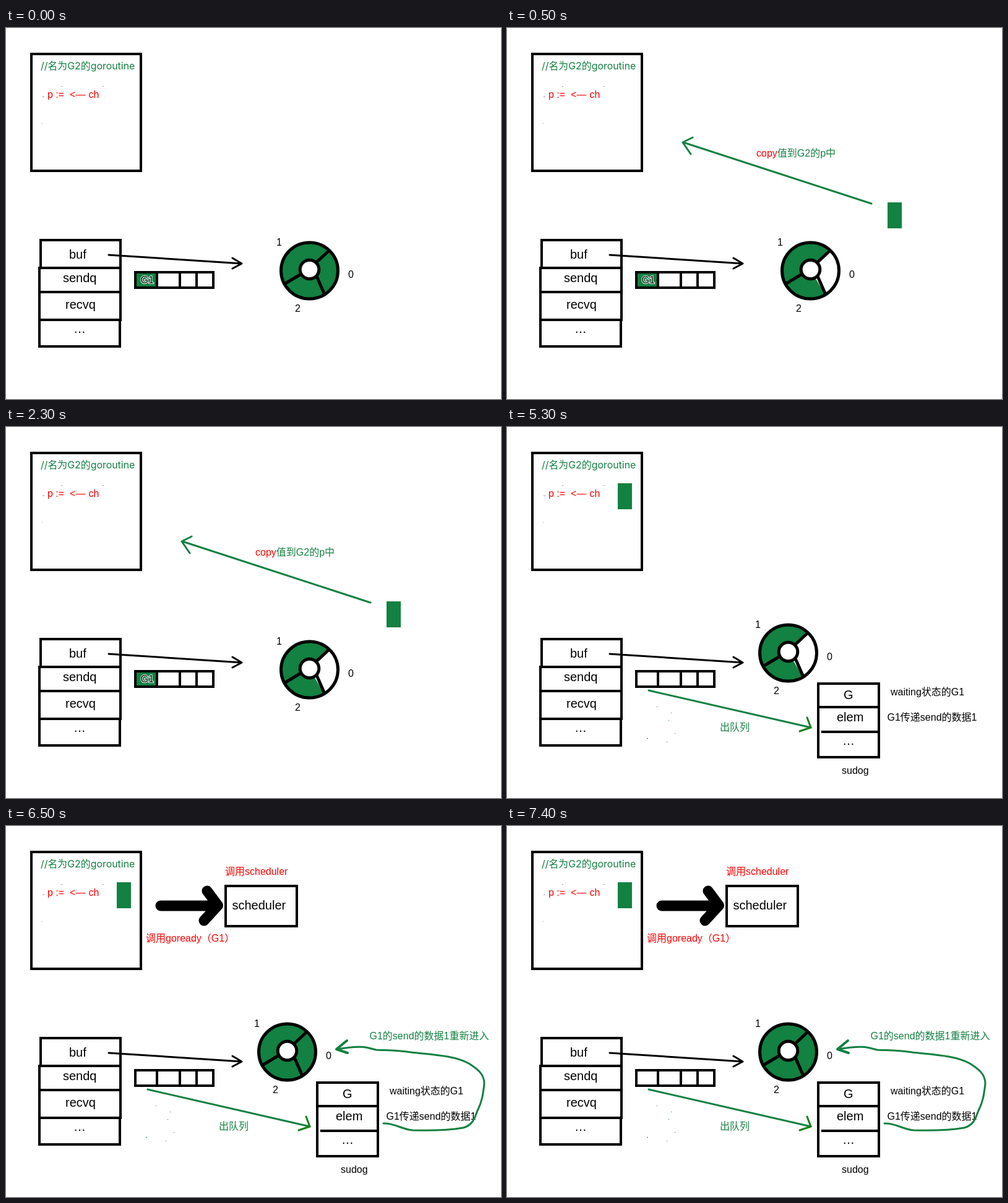
Recreate the animation shown at these times as an HTML page. Size 800 px wide and 600 px high, loop 8 s.

```html
<!DOCTYPE html>
<html lang="zh">
<head>
<meta charset="utf-8">
<title>Channel receive</title>
<style>
  html, body { margin: 0; width: 100%; height: 100%; overflow: hidden; background: #fff; }
  svg { display: block; width: 100vw; height: 100vh; }
  text { font: 16px "Liberation Sans", "Noto Sans CJK SC", "Noto Sans CJK", sans-serif; white-space: pre; }
  .big { font-size: 20px; }
  .code { font: 15.9px Inter, "Noto Sans CJK SC", "Noto Sans CJK", sans-serif; }
  .line { fill: none; stroke: #000; stroke-width: 4; }
  .thin { stroke-width: 3; stroke-linecap: round; stroke-linejoin: round; }
  .green { stroke: #128141; }
  .fill { fill: #128141; }
  .red { fill: #f00; }
</style>
</head>
<body>
<svg viewBox="0 0 800 600">
  <rect width="800" height="600" fill="#fff"/>

  <!-- receiving goroutine -->
  <rect class="line" x="41" y="42" width="177" height="189"/>
  <text class="code fill" x="56" y="66.5">//名为G2的goroutine</text>
  <text class="red" y="113"><tspan x="67">p :=</tspan><tspan x="103">&lt;</tspan><tspan x="112.5">—</tspan><tspan x="133.5">ch</tspan></text>
  <path d="M59 111h3M89 94.5h2M156 94.5h2M58 154.5h1" stroke="#999" fill="none"/>

  <!-- channel struct -->
  <path class="line" d="M56 343H185V472M56 341V388M52 388H185M54 386V517M52 427H187M52 472H187M184 472V515H54"/>
  <text class="big" x="102" y="373">buf</text>
  <text class="big" x="92" y="411">sendq</text>
  <text class="big" x="96" y="454">recvq</text>
  <text class="big" x="109" y="492.5">…</text>
  <path class="line thin" d="M166 367L381 381M366 372L381 381L366 389"/>

  <!-- send queue -->
  <rect id="head" class="fill" x="209" y="395" width="35" height="25"/>
  <path class="line" d="M209 395H335V420H209ZM244 395V420M281 395V420M308 395V420"/>
  <text id="g1" x="217.5" y="412.5" stroke="#fff" stroke-width="2" paint-order="stroke">G1</text>

  <!-- ring buffer -->
  <g id="ring">
    <ellipse class="fill" cx="490.5" cy="392.5" rx="46" ry="45.5"/>
    <path id="slot" d="M490 390L522 359A46 45.5 0 0 1 514 431Z" fill="#fff"/>
    <ellipse class="line" cx="490.5" cy="392.5" rx="46" ry="45.5" style="stroke-width:5"/>
    <path class="line" d="M490 390L522 360M490 390L450 414M497 390L514.5 430" style="stroke-width:5"/>
    <circle class="line" cx="490.5" cy="390.5" r="15.3" style="fill:#fff;stroke-width:5"/>
    <text x="437" y="351.5">1</text>
    <text x="553" y="403.5">0</text>
    <text x="467" y="458.5">2</text>
  </g>

  <g id="copy">
    <path class="line thin green" d="M285 185L589 284M300 177L284 185L297 204"/>
    <text class="fill" x="403" y="208"><tspan class="red">copy</tspan>值到G2的p中</text>
  </g>
  <rect id="value" class="fill" width="23" height="42"/>

  <!-- dequeued sudog -->
  <g id="sudog">
    <path class="line thin green" d="M229 426L491 486"/>
    <path class="line thin" d="M485 470L491 486L473 492" style="stroke:#128210"/>
    <text class="fill" x="344" y="490.5">出队列</text>
    <path class="line" d="M503 415H601V534H503ZM503 453H601M508 493H601"/>
    <text class="big" x="544" y="439.5">G</text>
    <text class="big" x="533" y="475.5">elem</text>
    <text class="big" x="542" y="513.5">…</text>
    <text x="541" y="561">sudog</text>
    <text x="620" y="434">waiting状态的G1</text>
    <text x="614.5" y="475">G1传递send的数据1</text>
    <path d="M226 503.5h2M242 452.5h1M265 462.5h1M261 474.5h1M258 509.5h1M271 495.5h1" stroke="#128141" fill="none"/>
  </g>

  <!-- waking the sender -->
  <g id="ready">
    <path class="line" d="M250 129H342M325 105L342.500 128.500L320 153" style="stroke-width:17;stroke-linecap:round;stroke-linejoin:round"/>
    <rect class="line" x="355" y="97" width="115" height="65"/>
    <text class="big" x="365.500" y="135">scheduler</text>
    <text class="red" x="354" y="78.500">调用scheduler</text>
    <text class="red" x="226" y="187">调用goready（G1）</text>
    <text class="fill" x="587.500" y="345">G1的send的数据1重新进入</text>
    <path class="line thin green" d="M610 481C628 480 640 491 657 492C690 493 716 492 739 488C757 483 758 468 763 458C770 444 771 432 773 417C773 401 762 393 748 384C724 371 690 370 655 366C630 362 615 363 598 362C583 358 575 354 534 361"/>
    <path class="line thin green" d="M551 347L534 361L552 367" style="stroke-width:4"/>
  </g>
</svg>
<script>
  const LOOP = 8000;
  const CUTS = [500, 3500, 6500];
  const start = performance.now();
  const el = id => document.getElementById(id);
  const show = (id, on) => el(id).setAttribute("visibility", on ? "visible" : "hidden");
  const move = (id, x, y) => el(id).setAttribute("transform", `translate(${x} ${y})`);

  function draw(time) {
    const step = CUTS.filter(cut => time >= cut).length;
    const moved = step >= 2;
    show("head", !moved);
    show("g1", !moved);
    show("slot", step === 1 || step === 2);
    show("copy", step === 1);
    show("value", step > 0);
    show("sudog", moved);
    show("ready", step === 3);
    move("ring", moved ? -36 : 0, moved ? -27 : 0);
    move("value", moved ? 179 : 615, moved ? 91 : 282);
  }

  function tick() {
    draw((performance.now() - start) % LOOP);
    requestAnimationFrame(tick);
  }
  tick();
</script>
</body>
</html>
```
